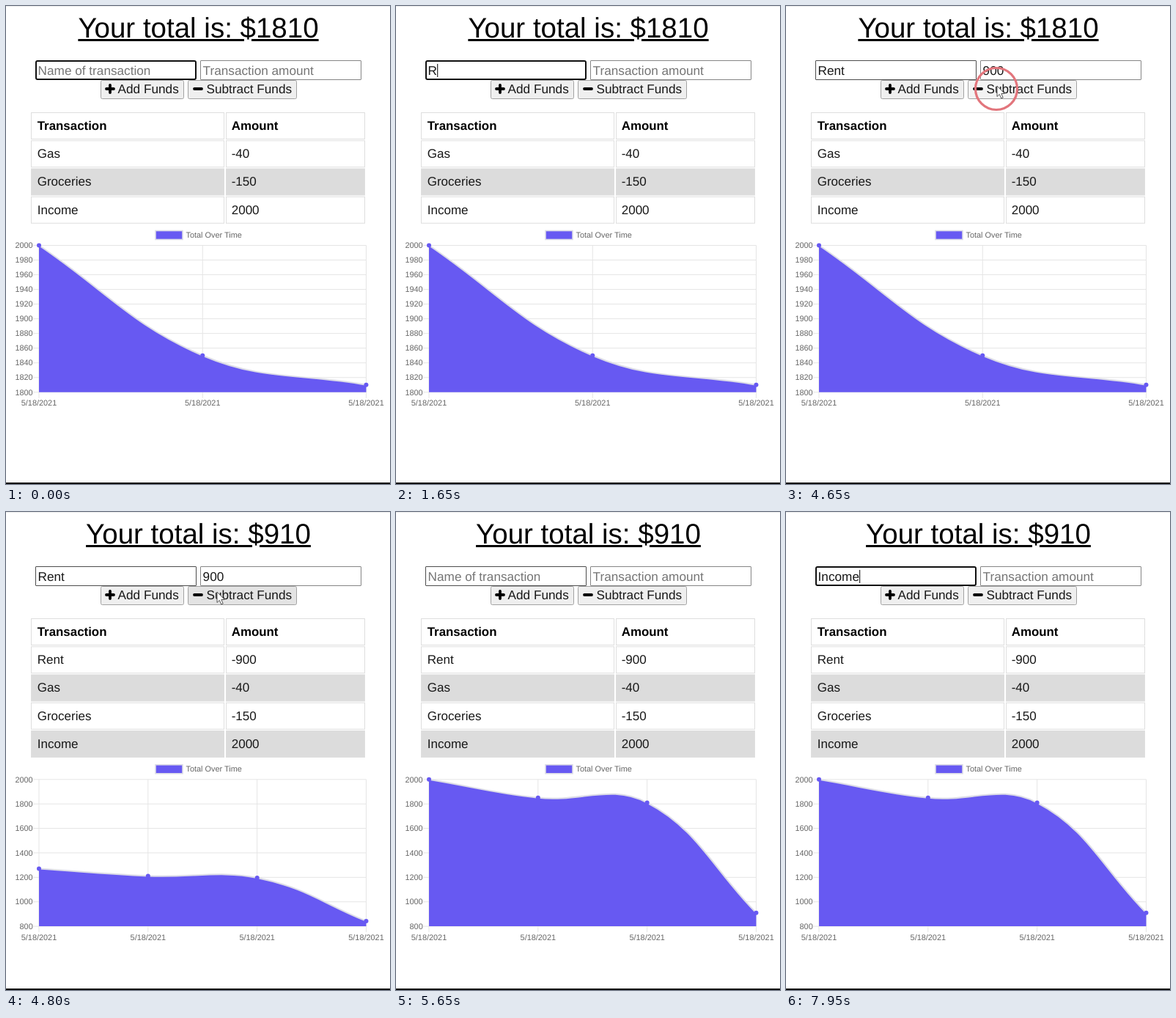
Write an HTML page that moves like this. It is 524 px wide and 652 px high and loops after 8000 ms.

```html
<!DOCTYPE html>
<html lang="en">
<head>
<meta charset="utf-8">
<title>Budget tracker</title>
<style>
  html, body { margin: 0; width: 100%; height: 100%; overflow: hidden; background: #fff; }
  body { position: relative; font-family: "Liberation Sans", Arial, sans-serif; text-rendering: geometricPrecision; }
  h1 { position: absolute; left: 0; top: 8px; width: 525px; margin: 0; text-align: center;
       font-size: 38.5px; font-weight: 400; line-height: 46px; text-decoration: underline; white-space: nowrap; }
  svg { position: absolute; left: 0; top: 0; }
  text { font-size: 17.2px; fill: #181818; white-space: pre; }
  .cell { font-size: 17.05px; }
  .head { font-size: 16.9px; font-weight: 700; fill: #000; }
  .tick { font-size: 10.9px; fill: #666; }
</style>
</head>
<body>
<h1 id="title"></h1>
<svg id="stage" width="524" height="652" viewBox="0 0 524 652"></svg>
<script>
const LOOP = 8000;
const SUBMIT = 4684, CLEAR = 4880;
const BLUE = '#6759f2', EDGE = '#dcdce6', GRID = '#e5e5e5';
const stage = document.getElementById('stage');
const title = document.getElementById('title');

function add(parent, tag, attrs, content) {
  const node = document.createElementNS('http://www.w3.org/2000/svg', tag);
  set(node, attrs);
  if (content !== undefined) node.textContent = content;
  return parent.appendChild(node);
}
function set(node, attrs) {
  for (const k in attrs) node.setAttribute(k, attrs[k]);
}
const show = (node, on) => set(node, { visibility: on ? 'visible' : 'hidden' });
const group = parent => add(parent, 'g', {});
const rect = (p, x, y, width, height, attrs) => add(p, 'rect', { x, y, width, height, ...attrs });
const label = (p, x, y, str, attrs = {}) => add(p, 'text', { x, y, ...attrs }, str);

// ---- form ----
function makeField(x, border, hint) {
  const g = group(stage);
  return {
    x, border, hint,
    box: rect(g, x, 74, 220, 27, { fill: '#fff' }),
    text: label(g, x + 3.6, 93.8, ''),
    caret: rect(g, 0, 79, 1, 18, { fill: '#000' })
  };
}

function drawField(f, value, focused, caretOn) {
  const inset = focused ? 1 : 0.5;
  set(f.box, {
    x: f.x + inset, y: 74 + inset, width: 220 - 2 * inset, height: 27 - 2 * inset,
    rx: focused ? 2 : 0.5, stroke: focused ? '#101010' : f.border, 'stroke-width': 2 * inset
  });
  const str = value || f.hint;
  if (f.text.textContent !== str) f.text.textContent = str;
  f.text.style.fill = value ? '#181818' : '#757575';
  const width = value ? f.text.getComputedTextLength() : 0;
  set(f.caret, { x: f.x + 3.8 + width });
  show(f.caret, focused && caretOn);
}

function makeButton(x, width, textX, str, icon) {
  const box = rect(stage, x + 0.5, 101.5, width - 1, 25, { rx: 2, fill: '#efefef', stroke: '#a2a2a2' });
  add(stage, 'path', { d: icon, stroke: '#000', 'stroke-width': 3.8, 'stroke-linecap': 'round' });
  label(stage, textX, 119, str);
  return box;
}

const nameField = makeField(40, '#4c4c4c', 'Name of transaction');
const amountField = makeField(265, '#858585', 'Transaction amount');

const spinner = group(stage);
rect(spinner, 468, 78, 13, 19, { fill: '#efefef' });
add(spinner, 'path', { d: 'M472 85.5l2.7-3.5 2.7 3.5zM472 90.5l2.7 3.5 2.7-3.5z', fill: '#505050' });

makeButton(129, 114, 152.6, 'Add Funds', 'M137 113h10M142 108v10');
const subtract = makeButton(248, 149, 273.5, 'Subtract Funds', 'M257 113h10');

// ---- table ----
function makeTable(parent, rows) {
  [['Transaction', 'Amount'], ...rows].forEach((row, i) => {
    const y = 145.5 + i * 38.25;
    const fill = i && i % 2 === 0 ? '#dcdcdc' : '#fff';
    const attrs = { fill, stroke: '#dedede' };
    rect(parent, 34.5, y, 263, 36, attrs);
    rect(parent, 300.5, y, 189, 36, attrs);
    const cls = { class: i ? 'cell' : 'head' };
    label(parent, 42.7, y + 23.4, row[0], cls);
    label(parent, 307.7, y + 23.4, row[1], cls);
  });
}

// ---- chart ----
const LEFT = 45, RIGHT = 491.5, HEIGHT = 200.3;

function makeChart(parent, top, values, min, max, step) {
  const base = top + HEIGHT;
  const grid = group(parent);
  const yOf = v => base - (v - min) / (max - min) * HEIGHT;
  const line = d => add(grid, 'path', { d, stroke: GRID, fill: 'none' });

  rect(grid, 204, top - 20, 37, 12, { fill: BLUE, stroke: EDGE, 'stroke-width': 1.6 });
  label(grid, 245.5, top - 11, 'Total Over Time', { class: 'tick' });
  for (let v = min; v <= max; v += step) {
    const y = yOf(v);
    line(`M37 ${y}H${RIGHT}`);
    label(grid, 36.7, y + 3.7, v, { class: 'tick', 'text-anchor': 'end' });
  }
  const pts = values.map((v, i) => ({ x: LEFT + (RIGHT - LEFT) * i / (values.length - 1), y: yOf(v) }));
  pts.forEach(p => {
    line(`M${p.x} ${top}V${base + 8}`);
    label(grid, p.x, base + 18.6, '5/18/2021', { class: 'tick', 'text-anchor': 'middle' });
  });

  // Spline handles with tension 0.4, kept inside the plot.
  const clampY = y => Math.min(base, Math.max(top, y));
  const handles = pts.map((p, i) => {
    const a = pts[i - 1] || p, b = pts[i + 1] || p;
    const da = Math.hypot(p.x - a.x, p.y - a.y), db = Math.hypot(b.x - p.x, b.y - p.y);
    const at = k => ({ x: p.x + k * (b.x - a.x), y: clampY(p.y + k * (b.y - a.y)) });
    return { before: at(-0.4 * da / (da + db)), after: at(0.4 * db / (da + db)) };
  });

  const area = add(parent, 'path', { fill: BLUE });
  const curve = add(parent, 'path', { fill: 'none', stroke: EDGE, 'stroke-width': 2 });
  const dots = pts.map(p => add(parent, 'circle', { cx: p.x, r: 3, fill: BLUE }));

  return grow => {
    const lift = y => base + (y - base) * grow;
    const xy = p => `${p.x.toFixed(2)} ${lift(p.y).toFixed(2)}`;
    let d = 'M' + xy(pts[0]);
    for (let i = 1; i < pts.length; i++) {
      d += `C${xy(handles[i - 1].after)} ${xy(handles[i].before)} ${xy(pts[i])}`;
    }
    set(curve, { d });
    set(area, { d: `${d}V${base}H${LEFT}Z` });
    dots.forEach((dot, i) => set(dot, { cy: lift(pts[i].y) }));
  };
}

const past = [['Gas', '-40'], ['Groceries', '-150'], ['Income', '2000']];
const before = group(stage), after = group(stage);
makeTable(before, past);
makeTable(after, [['Rent', '-900'], ...past]);
makeChart(before, 326.5, [2000, 1850, 1810], 1800, 2000, 20)(1);
const growChart = makeChart(after, 364.8, [2000, 1850, 1810, 910], 800, 2000, 200);

rect(stage, 0, 0, 524, 1, { fill: '#ededed' });
rect(stage, 0, 650, 524, 2, { fill: '#000' });

// ---- pointer ----
const ring = add(stage, 'circle', { r: 28.5, fill: 'none', stroke: '#e2757c', 'stroke-width': 3.2 });
const pointer = add(stage, 'path', {
  d: 'M0 0V14.5L3.3 11.4 5.8 17 8.2 16 5.8 10.5H10.2Z', fill: '#fff', stroke: '#555', 'stroke-width': 1
});

// ---- timeline ----
const nameSteps = [[0, ''], [1650, 'R'], [1850, 'Re'], [1900, 'Ren'], [2000, 'Rent'], [CLEAR, ''],
  [6900, 'I'], [7100, 'In'], [7400, 'Inc'], [7550, 'Inco'], [7750, 'Incom'], [7900, 'Income']];
const amountSteps = [[0, ''], [3000, '9'], [3300, '90'], [3500, '900'], [CLEAR, '']];
const focusSteps = [[0, 'name'], [2300, 'amount'], [4600, ''], [5700, 'name']];
const path = [[3900, 358, 150], [4000, 344, 138], [4150, 344, 138], [4450, 288, 109],
  [5000, 288, 109], [5400, 110, 92]];
const clicks = [[4600, 4690, 287, 113], [5720, 5850, 110, 86]];

const current = (steps, t) => steps.filter(s => s[0] <= t).pop();

// Blinks every half second, starting anew at each key or focus change.
function caretOn(t) {
  if (t < 150) return false;
  const last = Math.max(150, ...[nameSteps, amountSteps, focusSteps].map(s => current(s, t)[0]));
  return (t - last) % 1000 < 500;
}

function along(t) {
  const i = path.findIndex(p => p[0] > t);
  if (i < 0) return path[path.length - 1].slice(1);
  if (i === 0) return path[0].slice(1);
  const [a, b] = [path[i - 1], path[i]];
  const k = (t - a[0]) / (b[0] - a[0]);
  const e = k * k * (3 - 2 * k);
  return [a[1] + (b[1] - a[1]) * e, a[2] + (b[2] - a[2]) * e];
}

function draw(t) {
  const done = t >= SUBMIT;
  const heading = 'Your total is: $' + (done ? 910 : 1810);
  if (title.textContent !== heading) title.textContent = heading;
  show(before, !done);
  show(after, done);
  const p = Math.min(1, Math.max(0, (t - SUBMIT) / 1000));
  growChart(1 - (1 - p) ** 4);

  const focus = current(focusSteps, t)[1], blink = caretOn(t);
  drawField(nameField, current(nameSteps, t)[1], focus === 'name', blink);
  drawField(amountField, current(amountSteps, t)[1], focus === 'amount', blink);
  show(spinner, focus === 'amount');

  const [x, y] = along(t);
  const visible = t >= 3900 && t < 5450;
  set(pointer, { transform: `translate(${x} ${y})` });
  show(pointer, visible);
  const click = clicks.find(c => t >= c[0] && t < c[1]);
  show(ring, !!click);
  if (click) set(ring, { cx: click[2], cy: click[3] });
  const hover = visible && x > 248 && x < 397 && y > 101 && y < 126;
  set(subtract, { fill: hover ? (click ? '#f3f3f3' : '#e3e3e3') : '#efefef' });
}

const start = performance.now();
function tick() {
  draw((performance.now() - start) % LOOP);
  requestAnimationFrame(tick);
}
draw(0);
requestAnimationFrame(tick);
</script>
</body>
</html>
```
